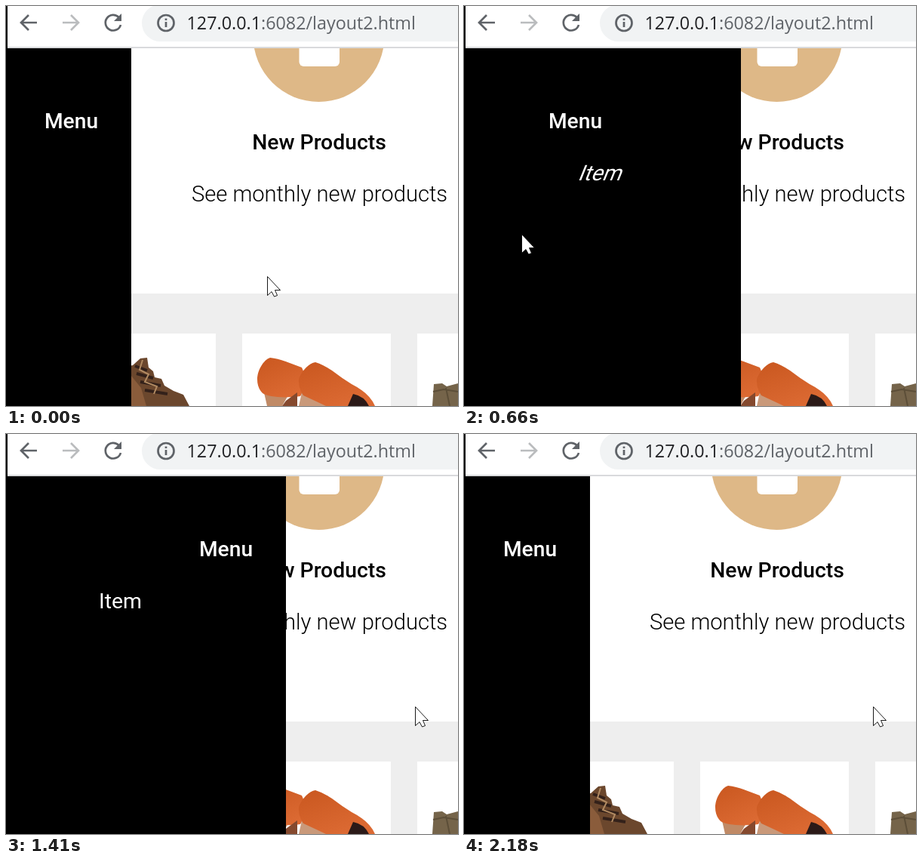
Write an HTML page that moves like this. It is 599x530 px and loops after 2200 ms.

```html
<!DOCTYPE html>
<html lang="en">
<head>
<meta charset="utf-8">
<title>Sliding menu</title>
<style>
  html, body { margin: 0; width: 100%; height: 100%; overflow: hidden; background: #fff; }
  svg { display: block; width: 599px; height: 530px; }
  text { font: 300 28.5px Roboto, sans-serif; text-anchor: middle; }
  .bold { font-weight: 500; }
  .url { font: 23.3px "Open Sans", sans-serif; text-anchor: start; }
  .icon { fill: none; stroke: #5f6368; stroke-width: 2.7; }
</style>
</head>
<body>
<svg viewBox="0 0 599 530">
  <defs>
    <linearGradient id="suede" x2=".6" y2="1">
      <stop stop-color="#c9571f"/>
      <stop offset="1" stop-color="#dc6a33"/>
    </linearGradient>
  </defs>
  <rect width="599" height="530" fill="#fff"/>

  <!-- page -->
  <circle cx="414.5" cy="40" r="87" fill="#deb887"/>
  <rect x="388.5" y="30" width="53.5" height="50" rx="6" fill="#fff"/>
  <text class="bold" x="415" y="190" style="font-size:28.3px">New Products</text>
  <text x="415.5" y="259" style="font-size:29.15px">See monthly new products</text>
  <rect y="381" width="599" height="149" fill="#eee"/>
  <path d="M81 434H278V530H81zM313 434H510V530H313zM545 434H599V530H545z" fill="#fff"/>

  <!-- brown boot -->
  <path d="M150 480L168 476L178 467L187 466L189 479L195 484L197 492L206 494L210 503L222 510L235 515L243 530H150z" fill="#6b472d"/>
  <path d="M150 488L166 490L179 506L186 530H150z" fill="#8a5c3b"/>
  <path d="M171 477L187 483M173 487L195 493M178 498L205 503M184 509L214 514" fill="none" stroke="#33211a" stroke-width="4"/>
  <path d="M181 469L177 482L189 488L184 498L200 504L196 514" fill="none" stroke="#b18a62" stroke-width="2"/>

  <!-- orange heels -->
  <path d="M341 508L375 514L366 530H346z" fill="#c08a66"/>
  <path d="M333 495C333 483 341 469 350 466C363 467 378 474 392 479L401 500L390 517C368 520 347 518 340 513Q333 506 333 495z" fill="url(#suede)"/>
  <path d="M386 512L371 523L366 530H386z" fill="#85492e"/>
  <path d="M392 512L432 522L428 530H388z" fill="#c9997a"/>
  <path d="M388 494C392 483 402 473 410 472Q420 475 432 483Q445 493 458 501Q482 513 489 530H424Q407 522 394 516Q387 506 388 494z" fill="url(#suede)"/>
  <path d="M460 514Q475 517 481 530H453z" fill="#2b1a18"/>

  <!-- olive boot -->
  <path d="M565 530L567 501L578 500L584 504L599 500V530z" fill="#75644a"/>
  <path d="M566 511L580 508L599 511M583 506L588 530" fill="none" stroke="#5c4e38" stroke-width="2"/>

  <!-- menu panel -->
  <rect id="panel" y="56" height="474"/>
  <g fill="#fff">
    <text id="menu" class="bold" y="162" style="font-size:28.2px">Menu</text>
    <text id="item" y="10" style="font-weight:400">Item</text>
  </g>

  <!-- browser bar -->
  <rect width="599" height="54" fill="#fff"/>
  <rect y="54" width="599" height="2" fill="#d9dadc"/>
  <rect width="2" height="56"/>
  <rect x="180" y="-2" width="500" height="49" rx="24.5" fill="#f1f3f4"/>
  <g class="icon">
    <path d="M41 22H20M30 12L20 22L30 32"/>
    <path d="M75 22H96M86 12L96 22L86 32" stroke="#babcbe"/>
    <path d="M149.500 15A10.300 10.300 0 1 0 152 25"/>
    <circle cx="212" cy="22.500" r="10.500"/>
    <path d="M212 21V28M212 16.500V19"/>
  </g>
  <path d="M153 10V20H143z" fill="#5f6368"/>
  <text class="url" x="239.5" y="31" fill="#5f6368"><tspan fill="#202124">127.0.0.1</tspan>:6082/layout2.html</text>

  <path id="cursor" d="M.5 .5V25.500L6 20.500L9.500 27L13.500 25.500L10.500 18.500H17.500z" fill="#fff" stroke="#000" stroke-width=".9"/>
</svg>
<script>
const LOOP = 2200, OPEN = 194, CLOSE = 1245, SLIDE = 1000;
const CLOSED_EDGE = 166, OPEN_EDGE = 428;
const [panel, menu, item, cursor] =
  ["panel", "menu", "item", "cursor"].map(id => document.getElementById(id));

const clamp = v => Math.min(1, Math.max(0, v));
const mix = (a, b, k) => a + (b - a) * k;
const smooth = v => (v = clamp(v), v * v * (3 - 2 * v));
const bezier = (a, b, u) => 3 * a * u * (1 - u) ** 2 + 3 * b * u * u * (1 - u) + u ** 3;

// CSS "ease": cubic-bezier(.25, .1, .25, 1)
function ease(x) {
  x = clamp(x);
  let low = 0, high = 1;
  for (let i = 0; i < 20; i++) {
    const mid = (low + high) / 2;
    if (bezier(.25, .25, mid) < x) low = mid; else high = mid;
  }
  return bezier(.1, 1, low);
}

// Linear interpolation through [time, shift, skew] keys
const itemKeys = [[190, -60, 10], [500, 30, -28], [840, 41, -15], [1090, 3, -1], [1190, 0, 0]];
function itemPose(t) {
  const next = itemKeys.findIndex(key => key[0] > t);
  if (next < 1) return next ? [0, 0] : [-60, 10];
  const a = itemKeys[next - 1], b = itemKeys[next];
  const k = (t - a[0]) / (b[0] - a[0]);
  return [mix(a[1], b[1], k), mix(a[2], b[2], k)];
}

function draw(now) {
  const t = now % LOOP;
  const progress = t < CLOSE ? ease((t - OPEN) / SLIDE) : 1 - ease((t - CLOSE) / SLIDE);
  const edge = Math.round(mix(CLOSED_EDGE, OPEN_EDGE, progress));
  const hovered = t >= OPEN && t < CLOSE;
  const [shift, skew] = itemPose(t);

  panel.setAttribute("width", edge);
  menu.setAttribute("x", edge - (hovered ? 219.5 : 79.5));
  item.setAttribute("transform", `translate(${edge - 219.5 + shift} 221) skewX(${skew})`);

  const enter = smooth((t - 60) / 220), leave = smooth((t - 1110) / 200);
  const x = mix(mix(346, 76, enter), 542, leave);
  const y = mix(mix(358, 302, enter), 361, leave);
  cursor.setAttribute("transform", `translate(${x} ${y})`);
  requestAnimationFrame(draw);
}
requestAnimationFrame(draw);
</script>
</body>
</html>
```
